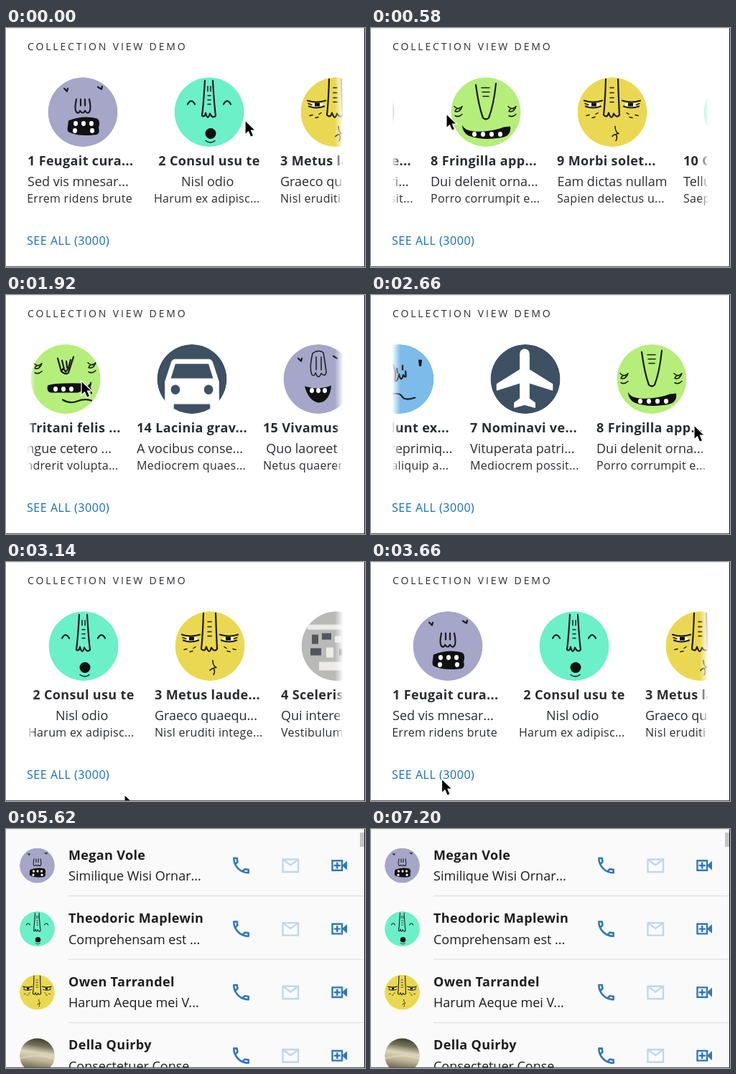
These frames come from a looping animation (500 by 334 pixels, 7260 ms). An HTML page:

```html
<!DOCTYPE html>
<html lang="en">
<head>
<meta charset="utf-8">
<title>Collection view demo</title>
<style>
  html, body { margin: 0; width: 100%; height: 100%; overflow: hidden; background: #fff; }
  svg { display: block; width: 500px; height: 334px; font: 18px "Open Sans", sans-serif; fill: #292c2f; }
  .heading { font-size: 14px; font-weight: 500; letter-spacing: 2.85px; }
  .title { font-weight: 700; letter-spacing: .35px; }
  .small { font-size: 16px; letter-spacing: .3px; }
  .link { font-size: 16px; font-weight: 500; letter-spacing: .55px; fill: #146fae; }
  .bar { font-size: 23px; fill: #fff; }
  .line { fill: none; stroke: #1c1c1c; stroke-width: 2.2; stroke-linecap: round; stroke-linejoin: round; }
  .thin { stroke-width: 1.5; }
  .ink { fill: #111; }
  .white { fill: #fff; }
  .list text { fill: #1d1d1d; }
  .list .bar { fill: #fff; }
  .icon { fill: none; stroke: #2f78b7; stroke-width: 2.4; }
</style>
</head>
<body>
<svg viewBox="0 0 500 334">
  <defs>
    <clipPath id="disc"><circle r="48.5"/></clipPath>
    <clipPath id="window"><path d="M30 60H469V260H30z"/></clipPath>
    <linearGradient id="fade"><stop stop-color="#fff"/><stop offset="1" stop-color="#fff" stop-opacity="0"/></linearGradient>
    <linearGradient id="sky" x2="0" y2="1"><stop stop-color="#4f8fc8"/><stop offset=".6" stop-color="#cfe0ea"/></linearGradient>
    <linearGradient id="planet" x1=".6" x2=".45" y2="1"><stop stop-color="#3d3b2d"/><stop offset=".22" stop-color="#77735a"/><stop offset=".42" stop-color="#dcd6bd"/><stop offset=".62" stop-color="#c0b797"/><stop offset="1" stop-color="#4a4433"/></linearGradient>
    <radialGradient id="ball" cx=".45" cy=".35"><stop stop-color="#f58518"/><stop offset="1" stop-color="#d9620a"/></radialGradient>
  </defs>
  <rect width="500" height="334" fill="#fff"/>
  <text class="heading" x="30" y="31">COLLECTION VIEW DEMO</text>
  <g clip-path="url(#window)"><g id="strip"></g></g>
  <rect id="leftFade" x="29" y="60" width="12" height="200" fill="url(#fade)"/>
  <rect x="-470" y="60" width="12" height="200" fill="url(#fade)" transform="scale(-1 1)"/>
  <text class="link" x="29" y="302.5">SEE ALL (3000)</text>
  <g id="list" class="list"></g>
  <path id="cursor" d="M0 0V20l4.5-4.2 3.2 7.4 4-1.7-3.2-7.3h6.2z" fill="#000" stroke="#fff" stroke-width="1.2"/>
  <path d="M0 .5H499" stroke="#e9e9e9"/>
  <path d="M0 333.5H499" stroke="#555"/>
  <path d="M499.5 0V334" stroke="#111"/>
</svg>
<script>
const LOOP = 7260, PITCH = 176, ROW = 88.6;
const $ = id => document.getElementById(id);
const line = (d, extra = '') => `<path class="line ${extra}" d="${d}"/>`;
const ink = d => `<path class="ink" d="${d}"/>`;
const white = d => `<path class="white" d="${d}"/>`;
const mirror = art => art + `<g transform="scale(-1 1)">${art}</g>`;
const scribble = (x, y) => line(`M${x - 6} ${y - 5}q5 6 11 0q-3 9-10 7q2-6 8-3M${x - 5} ${y + 8}q5 3 10-2`, 'thin');
// A row of small white teeth with the given spacing.
const teeth = (x, y, count, step) => Array.from({ length: count }, (_, i) =>
  `<ellipse class="white" cx="${x + i * step}" cy="${y}" rx="3" ry="3.4"/>`).join('');

const lavender = '#a5a6c8', mint = '#6cf0c7', yellow = '#ebd852', slate = '#3e5063', green = '#b5ee7b';

// Each avatar is a fill and its drawing, centred on 0,0.
const avatars = {
  grump: [lavender, line('M-26-33l4 4 1-4M21-35l5 3 1-4')
    + line('M-9-18Q-12-4-9 0Q-5 3-4-2Q0 4 3-2Q6 3 9 0Q12-4 9-18M-3-18v9M3-18v9')
    + ink('M-20 12Q0 4 20 9Q25 13 22 22Q25 32 15 32Q-5 34-17 29Q-23 28-21 20z')
    + teeth(-10, 16, 3, 11) + teeth(-11, 26, 2, 24)],
  whistle: [mint, mirror(line('M-30-11q5-9 10 0')) + line('M-6-44Q-8-10-10 5Q-6 8-5 1Q-2 13 1 2Q5 10 9 5Q7-10 5-44')
    + line('M-2-36v7M2-36v7M-2-23h4M-2-17h4M-2-11h4', 'thin')
    + '<circle class="ink" cx="2" cy="30" r="7.5"/>' + line('M-5 40q7 5 13 0', 'thin')],
  sleepy: [yellow, mirror(white('M-34-12h16v5h-16z') + line('M-39-16q12 4 25 0M-37-8q10 4 21 0', '') + ink('M-29-13h7v5h-7z') + line('M-38-12l5 2M-36 5l4-1M-28 8l4-1M-23 3l3-2', 'thin'))
    + line('M-9-46Q-10-14-12 4Q-7 9-5 1Q-1 13 2 2Q6 9 10 4Q9-16 8-46') + line('M-3-34h5M-3-27h5M-3-20h5M-3-14h5', 'thin')
    + line('M4 20q0 8 5 10q-7 1-9 4M5 31q3 5 0 9', 'thin')],
  board: ['#b9b9b7', ['M-40-30h80v7h-80z', 'M-34-16h9v13h-9z', 'M-20-18h13v9h-13z', 'M-2-14h9v9h-9z', 'M14-18h12v14h-12z', 'M-36 3h15v10h-15z', 'M-14 2h10v14h-10z', 'M4 4h9v9h-9z', 'M18 3h16v12h-16z', 'M-24 22h50v12h-50z']
    .map((d, i) => `<path d="${d}" fill="${i % 3 ? '#55565a' : '#ecebe8'}"/>`).join('')],
  planet: ['url(#planet)', '<path d="M-50 8Q0-8 50 10" fill="none" stroke="#efe6cc" stroke-width="4" opacity=".4"/>'],
  blue: ['#7cbbea', line('M-8-20Q-3-8-6 2Q-2 5 0-7Q3 6 6-6Q11 2 9-11M-3-15l1 6M5-19v6') + ink('M27-27h5l-1 9h-3zM-32-25h5l-1 8h-3z') + line('M-20 23q20-6 24 1t18 2')],
  plane: [slate, '<path class="white" stroke="#fff" stroke-width=".4" stroke-linejoin="round" transform="translate(-1 -1) scale(4.05) translate(-11.5 -12)" d="M21 16v-2l-8-5V3.5c0-.83-.67-1.5-1.5-1.5S10 2.67 10 3.5V9l-8 5v2l8-2.5V19l-2 1.5V22l3.5-1 3.5 1v-1.5L13 19v-5.5z"/>'],
  grin: [green, line('M-14-38Q-10-8-4 8Q0 12 4 8Q11-10 14-40') + line('M-6-34h11M-5-28h10M-4-22h8', 'thin') + scribble(-38, -3) + scribble(37, -3)
    + ink('M-33 18Q-30 26-16 27Q8 28 25 21L34 20Q36 34 20 36Q-6 40-24 33Q-33 28-33 18z') + teeth(-16, 31, 4, 12)],
  hill: ['url(#sky)', '<path d="M-50-40L-5-32Q12-22 50 10V50H-50z" fill="#a8694a"/><path d="M-50-8L-5-14Q14 0 46 8V18H-50z" fill="#bb7f58"/><path d="M-50 16Q0 8 50 12V50H-50z" fill="#a08c6c"/><path d="M-50 24Q0 18 50 26V34Q0 28-50 36z" fill="#6f7350"/>'],
  ball: ['url(#ball)', '<g transform="rotate(-6)">' + line('M-28-40Q-12 0-26 41M-49 0Q-10 8 49 4M-47-14Q0 4 32-38M-46 16Q8 0 32 38') + '</g>'],
  teeth: [green, line('M-11-29L-6-11Q0-5 4-9L11-31') + line('M-5-26l3 12M1-25l1 9M7-27l-3 11M-6-11l3-4 3 5 4-5') + scribble(-38, -17) + scribble(37, -18)
    + ink('M-25 9Q-16 5 24 6Q25 18 17 19H-20Q-27 18-25 9z') + teeth(-14, 14, 3, 11) + line('M24 10q12 2 11-5M-4 29q10 6 20 2t20-1M33 8l3 12')],
  car: [slate, '<path class="white" transform="translate(0 8) scale(4.2 4.5) translate(-12 -13)" d="M18.92 6.01C18.72 5.42 18.16 5 17.5 5h-11c-.66 0-1.21.42-1.42 1.01L3 12v8c0 .55.45 1 1 1h1c.55 0 1-.45 1-1v-1h12v1c0 .55.45 1 1 1h1c.55 0 1-.45 1-1v-8zM6.5 16a1.5 1.5 0 1 1 .01 0zm11 0a1.5 1.5 0 1 1 .01 0zM5 11l1.5-4.5h11L19 11z"/>'],
  laugh: [lavender, line('M-28-29l4 4 1-4M21-32l5 3') + line('M-8-36Q-13-16-9-6Q-5-3-4-9Q0 2 4-8Q10-2 11-10Q9-26 7-37Q0-42-8-36M-3-31v18M4-31v18', 'thin')
    + ink('M-19 10Q0 16 18 9Q16 32 0 33Q-14 30-19 10z') + teeth(-9, 16, 3, 9)]
};

const items = [
  ['grump', 'Feugait cura...', 'Sed vis mnesar...', 'Errem ridens brute\u00a0\u00a0'],
  ['whistle', 'Consul usu te', 'Nisl odio\u00a0', 'Harum ex adipisc...'],
  ['sleepy', 'Metus laude...', 'Graeco quaequ...', 'Nisl eruditi intege...'],
  ['board', 'Scelerisqu...', 'Qui interesset...', 'Vestibulum molli...'],
  ['planet', 'Option tale...', 'Usu habeo lorem...', 'Ridiculus an vero...'],
  ['blue', 'Tincidunt ex...', 'Mucius reprimiq...', 'Vivendo aliquip a...'],
  ['plane', 'Nominavi ve...', 'Vituperata patri...', 'Mediocrem possit...'],
  ['grin', 'Fringilla app...', 'Dui delenit orna...', 'Porro corrumpit e...'],
  ['sleepy', 'Morbi solet...', 'Eam dictas nullam', 'Sapien delectus u...'],
  ['whistle', 'Ornare viris...', 'Tellus omnium...', 'Saepe convenire...'],
  ['hill', 'Dignatum dui', 'Penatibus natoq...', 'Mauris condiment...'],
  ['ball', 'Accommod...', 'Risus litora lege...', 'Constituto reform...'],
  ['teeth', 'Tritani felis ...', 'Congue cetero ...', 'Hendrerit volupta...'],
  ['car', 'Lacinia grav...', 'A vocibus conse...', 'Mediocrem quaes...'],
  ['laugh', 'Vivamus adi...', 'Quo laoreet in an', 'Netus quaerendu...']
];

const contacts = [
  ['grump', 'Megan Vole', 'Similique Wisi Ornar...'],
  ['whistle', 'Theodoric Maplewin', 'Comprehensam est ...'],
  ['sleepy', 'Owen Tarrandel', 'Harum Aeque mei V...'],
  ['planet', 'Della Quirby', 'Consectetuer Conse...'],
  ['blue', 'Hazel Thornby', 'Vivendo Aliquip in...']
];

function avatar(name, x, y, scale = 1) {
  const [fill, art] = avatars[name];
  return `<g transform="translate(${x} ${y}) scale(${scale})" clip-path="url(#disc)"><circle r="48.5" fill="${fill}"/>${art}</g>`;
}

// Truncated lines start at the cell's edge; complete ones are centred.
function cellText(text, style, y) {
  const cut = text.endsWith('...');
  return `<text class="${style}" x="${cut ? -77 : 0}" y="${y}" text-anchor="${cut ? 'start' : 'middle'}">${text}</text>`;
}

$('strip').innerHTML = items.map(([art, title, sub, note], i) =>
  `<g transform="translate(${107 + i * PITCH})">${avatar(art, 0, 117.5)}${cellText(`${i + 1} ${title}`, 'title', 191.5)}${cellText(sub, '', 220.5)}${cellText(note, 'small', 244)}</g>`).join('');

const phone = '<path transform="translate(327.5 51) scale(1.27) translate(-12 -12)" fill="#2f78b7" d="M6.54 5c.06.89.21 1.76.45 2.59l-1.2 1.2c-.41-1.2-.67-2.47-.76-3.79h1.51m9.86 12.02c.85.24 1.72.39 2.6.45v1.49c-1.32-.09-2.59-.35-3.8-.75l1.2-1.19M7.5 3H4c-.55 0-1 .45-1 1 0 9.39 7.61 17 17 17 .55 0 1-.45 1-1v-3.49c0-.55-.45-1-1-1-1.24 0-2.45-.2-3.57-.57-.36-.09-.71-.05-1.02.24l-2.2 2.2c-2.83-1.45-5.15-3.76-6.59-6.59l2.2-2.2c.28-.28.36-.67.25-1.02C8.7 6.45 8.5 5.25 8.5 4c0-.55-.45-1-1-1z"/>';
const mail = '<path class="icon" style="stroke:#c1d7e9" d="M385.5 42.5h21.5v17.5h-21.5zl10.75 8 10.75-8"/>';
const video = '<path class="icon" d="M454.5 44.2h13.5v13.6h-13.5zM461.25 46.5v9M456.75 51h9"/><path fill="#2f78b7" d="M469 50l6-5.5v13l-6-5.5z"/>';

$('list').innerHTML = `<rect y="-57" width="500" height="460" fill="#fafafa"/>
  <rect y="-57" width="500" height="52.5" fill="#354a5f"/>
  <path d="M45-38H26m9-9l-9 9 9 9" fill="none" stroke="#fff" stroke-width="2.6"/>
  <text class="bar" x="87" y="-30">Contact Cell</text>`
  + contacts.map(([art, name, sub], i) => `<g transform="translate(0 ${i * ROW})">${avatar(art, 43.5, 51, .505)}
    ${i < 2 ? '<circle class="pending" cx="43.5" cy="51" r="24.5" fill="#354a5f"/>' : ''}
    <text class="title" x="87" y="42.5">${name}</text><text x="87" y="72">${sub}</text>
    ${phone}${mail}${video}<path d="M87 93.5H499" stroke="#d9d9d9"/></g>`).join('')
  + '<rect x="493" y="5" width="6" height="20" fill="#c4c4c4"/>';
const pending = document.querySelectorAll('.pending');

// Two drags, each followed by a fling that slows exponentially.
function scrollAt(t) {
  if (t < 20) return 0;
  if (t < 200) return 228 * ((t - 20) / 180) ** 2;
  if (t < 2200) return 2250 - 2022 * Math.exp((200 - t) / 598);
  if (t < 2367) return 2179 - 345 * ((t - 2200) / 167) ** 2;
  return Math.max(0, 2287 * Math.exp((2367 - t) / 598) - 453);
}

const cursorPath = [
  [0, 333, 129], [20, 333, 129], [200, 105, 120], [2200, 105, 120], [2367, 450, 182], [2740, 450, 182],
  [2960, 290, 318], [3140, 165, 325], [3420, 98.5, 303], [4020, 98.5, 303], [4060, 98.5, 305], [4080, 98.5, 303],
  [5050, 98.5, 303], [5350, 98.5, 345], [LOOP, 98.5, 345]
];

function cursorAt(t) {
  const i = cursorPath.findIndex(key => key[0] > t);
  const [t0, x0, y0] = cursorPath[i - 1], [t1, x1, y1] = cursorPath[i];
  const p = ((t - t0) / (t1 - t0)) ** (t < 2400 ? 2 : 1);
  return [x0 + (x1 - x0) * p, y0 + (y1 - y0) * p];
}

function render() {
  const now = performance.now() % LOOP, t = now - now % 20;
  const scroll = Math.round(scrollAt(t));
  $('strip').setAttribute('transform', `translate(${-scroll})`);
  $('leftFade').style.display = scroll ? '' : 'none';
  $('cursor').setAttribute('transform', `translate(${cursorAt(t)})`);

  const since = t - 4620;
  const left = duration => 1 - Math.min(1, since / duration);
  $('list').style.display = since < 0 ? 'none' : '';
  if (since >= 0) {
    $('list').style.opacity = 1 - .7 * left(180) ** 2;
    $('list').setAttribute('transform', `translate(0 ${57 * left(360) ** 4})`);
    pending.forEach(disc => disc.style.display = since < 120 ? '' : 'none');
  }
  requestAnimationFrame(render);
}
render();
</script>
</body>
</html>
```
